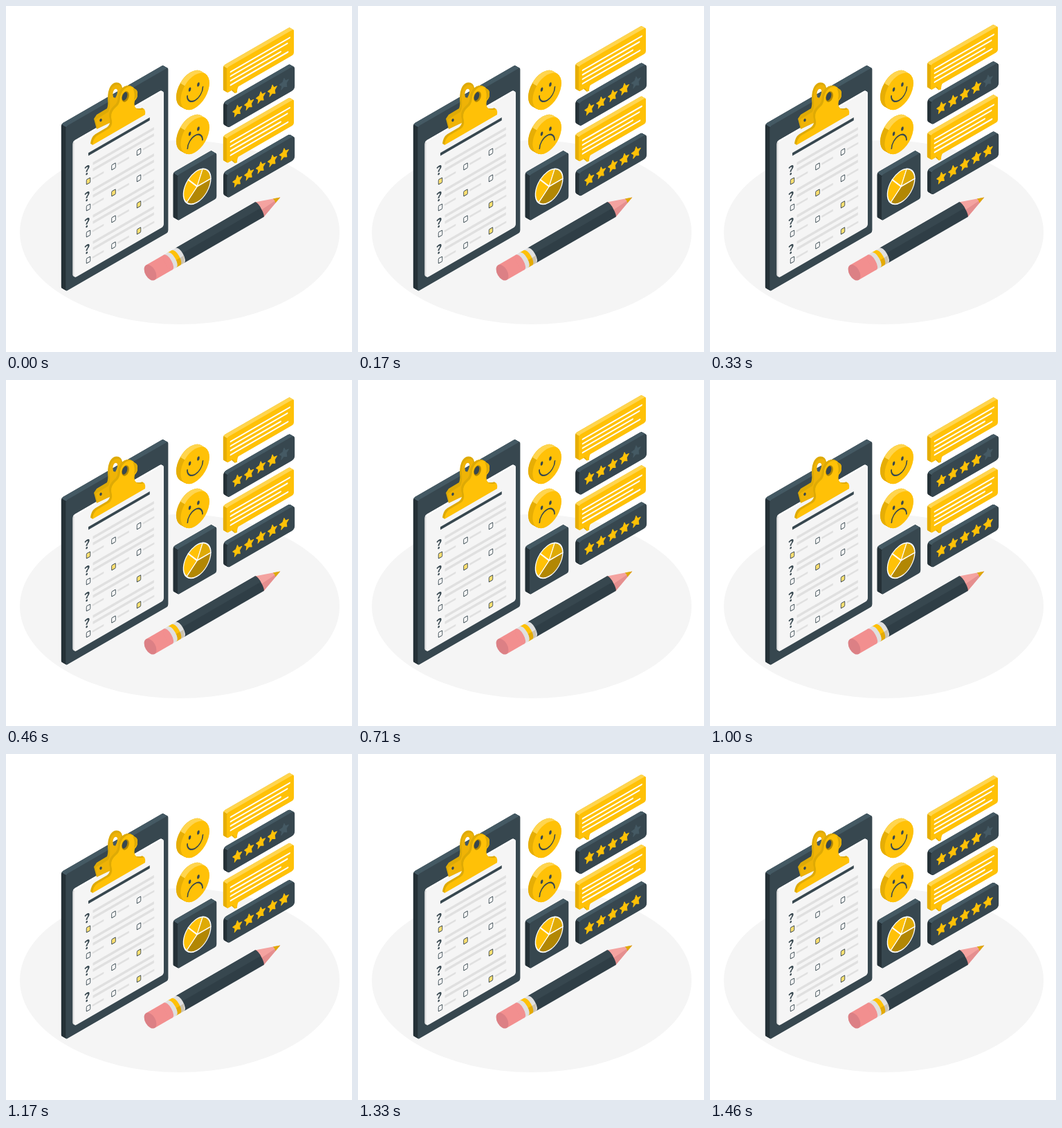
Write an HTML page with a canvas that moves like this. It is 500 by 500 pixels and loops after 1500 ms.

```html
<!DOCTYPE html>
<html lang="en">
<head>
<meta charset="utf-8">
<title>Survey</title>
<style>
html, body { margin: 0; width: 100%; height: 100%; overflow: hidden; background: #fff; }
canvas { display: block; width: 500px; height: 500px; }
</style>
</head>
<body>
<canvas id="stage" width="500" height="500"></canvas>
<script>
const ctx = document.getElementById('stage').getContext('2d');
const LOOP = 1500, FRAMES = 36, LIFT = 10;
const YELLOW = '#ffc107', GOLD = '#deaa06', PALE = '#ffd54f', BROWN = '#b28704';
const SLATE = '#37474f', DARK = '#263238', STEEL = '#455a64', GREY = '#e0e0e0';
const slateBox = [SLATE, DARK, STEEL], yellowBox = [YELLOW, '#e6ae06', PALE];
const paperBox = ['#f5f5f5', GREY, '#fff'];

function group(draw, ...matrix) {
  ctx.save();
  ctx.transform(...matrix);
  draw();
  ctx.restore();
}
const shift = (x, y, draw) => group(draw, 1, 0, 0, 1, x, y);
// Upright isometric plane with its origin at x, y
const iso = (x, y, draw) => group(draw, .866, -.5, 0, 1, x, y);

function fill(path, color, rule) {
  ctx.fillStyle = color;
  ctx.fill(new Path2D(path), rule);
}

function ellipse(x, y, rx, ry, color, turn = 0) {
  ctx.beginPath();
  ctx.ellipse(x, y, rx, ry, turn, 0, 7);
  ctx.fillStyle = color;
  ctx.fill();
}

function rect(x, y, w, h, color) {
  ctx.fillStyle = color;
  ctx.fillRect(x, y, w, h);
}

// Rounded slab whose thickness runs back to the upper left
function box(x, y, w, h, depth, r, [front, side, top], decorate = () => {}) {
  iso(x, y, () => {
    const slab = (back, color) => {
      ctx.beginPath();
      ctx.roundRect(-back, -back, w, h, r);
      ctx.fillStyle = color;
      ctx.fill();
    };
    const extrude = color => { for (let i = depth; i > 0; i -= .5) slab(i, color); };
    extrude(side);
    ctx.save();
    ctx.clip(new Path2D(`M-50-50H${w + 50}V${w + 50}Z`));
    extrude(top);
    ctx.restore();
    slab(0, front);
    decorate();
  });
}

function checkbox(x, y, on) {
  iso(x, y, () => {
    ctx.beginPath();
    ctx.roundRect(-3.2, -3.5, 6.4, 7, 1);
    ctx.fillStyle = on ? '#ffe070' : '#fafafa';
    ctx.fill();
    ctx.strokeStyle = SLATE;
    ctx.lineWidth = 1;
    ctx.stroke();
    rect(6.8, -1.4, 19, 2.8, GREY);
  });
}

function clipboard() {
  box(86.3, 174.3, 171, 238.2, 7.5, 3, slateBox);
  box(98.5, 196.9, 149.5, 196.3, 2.5, 4, paperBox);
  iso(119, 212.3, () => rect(0, 0, 102.5, 4.2, SLATE));
  const checked = [0, 1, 2, 2];
  checked.forEach((choice, row) => {
    const y = row * 38;
    iso(117.3, 237 + y, () => {
      ctx.fillStyle = SLATE;
      ctx.font = '700 18px "Open Sans", sans-serif';
      ctx.textAlign = 'center';
      ctx.fillText('?', 0, 6.5);
    });
    for (const line of [0, 9])
      iso(125.5, 226 + y + line, () => rect(0, 0, 102, 4, GREY));
    for (let i = 0; i < 3; i++) checkbox(119 + i * 36.5, 253 + y - i * 21.1, i === choice);
  });
}

function clip() {
  const hole = 'M155 132Q153 126 156 121Q159 118 161 121Q162 126 158 133Z';
  fill('M127 163L131 157L146 148Q148 143 147 135Q147 122 151 116Q156 109 163 111Q169 114 168 122L164 140L155 166L131 178Z' + hole, GOLD, 'evenodd');
  fill('M130 164L148 153Q151 146 150 137Q149 122 154 117Q160 111 166 116L167 121L162 138L152 168L132 177Z' + hole, '#efb306', 'evenodd');
  ellipse(137, 165, 1.7, 2.3, SLATE, .3);
  const front = 'M125 201Q126 191 132 187L149 177Q154 173 153 166Q150 156 156 149L162 143Q165 138 165 131Q167 122 174 118' +
    'Q182 114 186 120Q191 121 190 129Q190 133 186 137Q184 145 189 149Q194 151 200 149Q202 153 201 157Z';
  for (let i = 3; i > 0; i -= .5) shift(-i, -i * .58, () => fill(front, GOLD));
  fill(front, YELLOW);
  ellipse(172.5, 131, 5, 8, BROWN, .35);
  ellipse(171.6, 130.5, 3.4, 6.4, SLATE, .35);
  fill('M183 118Q190 120 190 129Q188 134 185 136Q187 126 183 118Z', GOLD);
}

function face(y, mouthY, r, from) {
  box(252.4, y - 12, 48, 48, 7.5, 24, yellowBox, () => {
    ellipse(15.2, 16.8, 2.1, 2.9, SLATE);
    ellipse(29.5, 16.8, 2.1, 2.9, SLATE);
    ctx.beginPath();
    ctx.arc(24, mouthY, r, from, from + Math.PI);
    ctx.strokeStyle = SLATE;
    ctx.lineWidth = 2;
    ctx.lineCap = 'round';
    ctx.stroke();
  });
}

function pie() {
  box(248, 244.6, 65, 66, 7.5, 3, slateBox, () => {
    const cuts = [-2.28, -1.15, 0, 2.45, 4];
    const colors = [YELLOW, GOLD, BROWN, YELLOW];
    ctx.strokeStyle = '#fff';
    ctx.lineWidth = 1.6;
    ctx.lineJoin = 'round';
    colors.forEach((color, i) => {
      ctx.beginPath();
      ctx.moveTo(32.5, 32.5);
      ctx.arc(32.5, 32.5, 22.8, cuts[i], cuts[i + 1]);
      ctx.closePath();
      ctx.fillStyle = color;
      ctx.fill();
      ctx.stroke();
    });
  });
}

function pencil() {
  const R = 12.4, turn = -Math.PI / 6, c = Math.cos(turn), s = Math.sin(turn);
  const tube = (from, to, color, bulge = 5) => {
    rect(from, -R, to - from, 2 * R, color);
    ellipse(to, 0, bulge, R, color);
  };
  group(() => {
    fill('M182-12.4L217-.3L182 12.4Z', '#f4a3a0');
    fill('M182 2L217-.3L182 12.4Z', '#e58f8f');
    fill('M207-3.8L217-.3L207 3.3Q208.5-.3 207-3.8Z', GOLD);
    tube(50, 182, '#2f3e46', 3);
    fill('M50-12.4H182Q185-9 185-1H50Z', SLATE);
    tube(36, 49.5, GREY);
    tube(36, 43, YELLOW);
    fill('M36 3H54L49.5 12.4H36Z', 'rgba(120,80,0,.2)');
    tube(28, 36.5, GREY);
    tube(0, 30, '#f28f8f');
    ellipse(0, 0, 7.4, R, '#dc8085');
  }, c, s, -s, c, 208.5, 385.2);
}

function star(x, y, color) {
  ctx.beginPath();
  for (let i = 0; i < 10; i++) {
    const a = i * Math.PI / 5, r = i % 2 ? 4 : 8;
    ctx.lineTo(x + r * Math.sin(a), y - r * Math.cos(a));
  }
  ctx.closePath();
  ctx.fillStyle = ctx.strokeStyle = color;
  ctx.lineWidth = 1;
  ctx.lineJoin = 'round';
  ctx.fill();
  ctx.stroke();
}

function review(y, rating) {
  shift(0, y, () => {
    fill('M323.5 120L330.5 126.2L334 125L334 114Z', GOLD);
    box(319, 89.6, 112, 36.8, 6, 3, yellowBox, () => {
      ctx.strokeStyle = '#fff';
      ctx.lineWidth = 2.3;
      ctx.lineCap = 'round';
      [105, 101, 90, 102].forEach((end, i) => {
        ctx.beginPath();
        ctx.moveTo(6.5, 9 + i * 6.4);
        ctx.lineTo(end, 9 + i * 6.4);
        ctx.stroke();
      });
    });
    fill('M327 120L336.5 114.5Q334 120 333.7 125L331 126Z', YELLOW);
    box(319.3, 142.5, 113, 34.7, 6, 5, slateBox, () => {
      for (let i = 0; i < 5; i++) star(17.3 + i * 19.5, 17.8, i < rating ? YELLOW : STEEL);
    });
  });
}

function draw(time) {
  // The float advances in steps of 24 per second
  const step = Math.floor((time % LOOP + 5) / LOOP * FRAMES) % FRAMES;
  const phase = (step + .5) / FRAMES;
  const lift = -LIFT * (1 - Math.abs(1 - 2 * phase));
  rect(0, 0, 500, 500, '#fff');
  ellipse(251, 327, 231, 133, '#f5f5f5');
  clipboard();
  clip();
  face(123.4, 24, 13, 0);
  face(187.4, 36.3, 12.5, Math.PI);
  pie();
  pencil();
  review(lift, 4);
  review(lift + 101.4, 5);
}

const start = performance.now();
function tick() {
  draw(performance.now() - start);
  requestAnimationFrame(tick);
}
tick();
</script>
</body>
</html>
```
